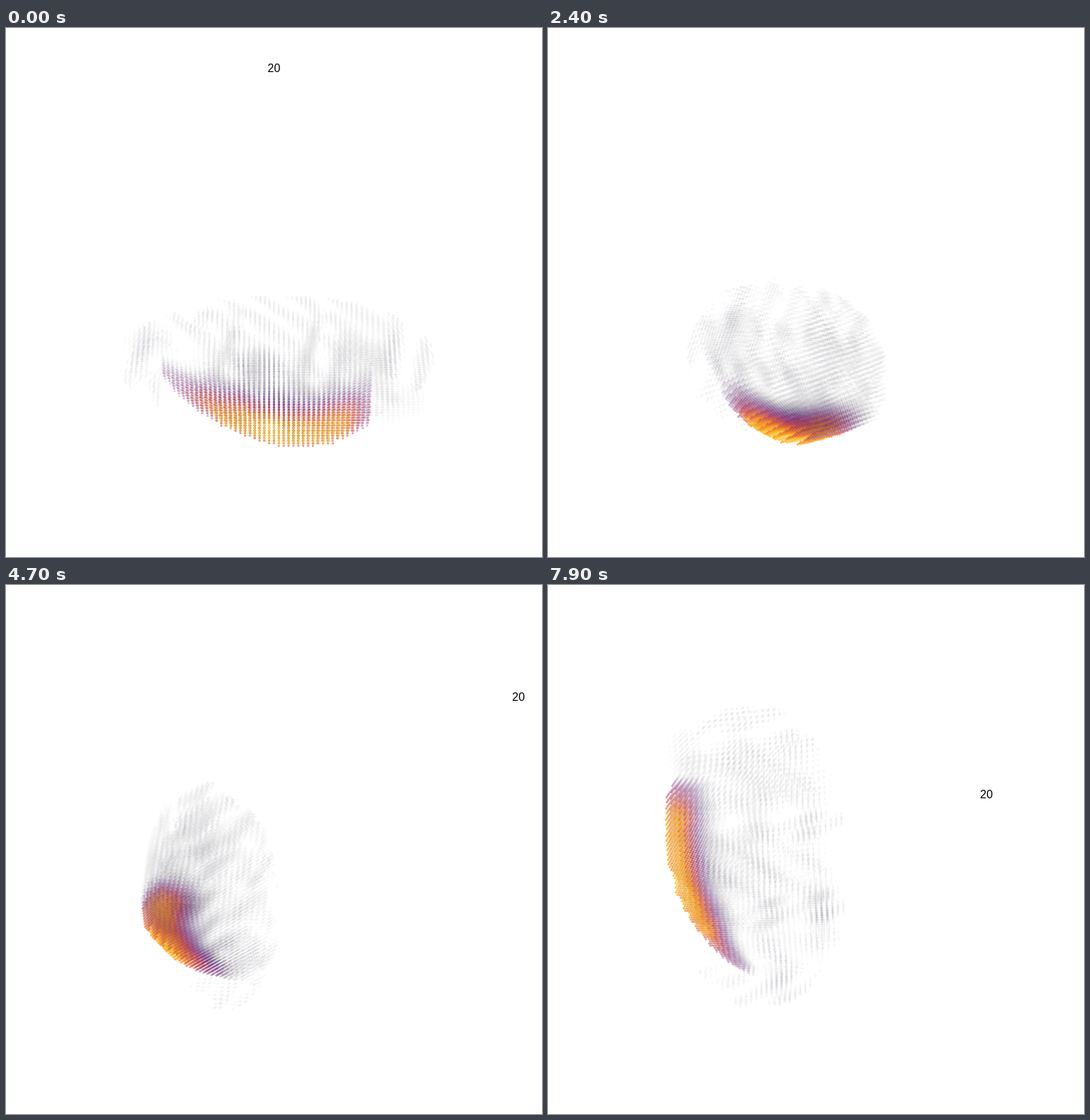
An HTML page with a canvas that plays this animation: 753x744 px, repeating every 8000 ms.

```html
<!DOCTYPE html>
<html lang="en">
<head>
<meta charset="utf-8">
<title>Rotating point cloud</title>
<style>
html, body { margin: 0; width: 100%; height: 100%; overflow: hidden; background: #fff; }
canvas { display: block; width: 753px; height: 744px; }
</style>
</head>
<body>
<canvas id="stage" width="753" height="744"></canvas>
<script>
const ctx = document.getElementById('stage').getContext('2d');
const LOOP = 8000, STEP = 100, DEG = Math.PI / 180;
const CENTER = { x: 376.5, y: 372 }, FOCAL = 1330, DISTANCE = 4.81;
const TILT_COS = Math.cos(70 * DEG), TILT_SIN = Math.sin(70 * DEG);

const clamp = (v, lo = 0, hi = 1) => Math.min(hi, Math.max(lo, v));
const bell = (v, mid, width) => Math.exp(-(((v - mid) / width) ** 2));
const ramp = (v, from, to) => {
  const u = clamp((v - from) / (to - from));
  return u * u * (3 - 2 * u);
};

// Dark violet to yellow colour scale
const SCALE = ['#000004', '#420a68', '#932667', '#dd513a', '#fca50a', '#fcffa4']
  .map(hex => [1, 3, 5].map(i => parseInt(hex.slice(i, i + 2), 16)));

function colour(level) {
  const pos = clamp(level) * (SCALE.length - 1), i = Math.min(SCALE.length - 2, Math.floor(pos));
  const rgb = SCALE[i].map((c, k) => Math.round(c + (SCALE[i + 1][k] - c) * (pos - i)));
  return `rgba(${rgb},${clamp(level * 0.95).toFixed(3)})`;
}

// Lower front edge of the body: a parabola in y and in z
const edgeY = x => -0.675 + 0.26 * ((x - 0.25) / 0.76) ** 2;
const edgeZ = x => -0.55 + 0.19 * ((x - 0.09) / (x < 0.09 ? 0.6 : 0.45)) ** 2;

// Centres of the denser grey lobes
const LOBES = [[-0.1, 0.03, -0.42], [0.17, -0.46, -0.38], [0.54, -0.57, -0.32], [-0.6, -0.2, -0.2], [-0.13, -0.64, -0.09]];

const wave = (x, y, z) =>
  Math.sin(17 * x + 9 * y + 2 * Math.sin(13 * z)) * Math.sin(15 * y - 12 * z + 2 * Math.sin(14 * x));

function slabLevel(x, a, b) {
  const left = ramp(x, -0.62, -0.1), right = ramp(x, 0.48, 0.3);
  const size = 0.4 + 0.6 * left;
  const q = ((a - 0.045) / (0.115 * size)) ** 2 + ((b - 0.08) / (0.165 * size)) ** 2;
  return 0.84 * (0.25 + 0.75 * left) * (0.35 + 0.65 * right) * Math.exp(-(q ** 1.3));
}

function skinLevel(x, y, z, a, b) {
  const along = ramp(x, -0.52, -0.25) * ramp(x, 0.42, 0.1);
  const under = 0.06 * bell(b, 0.03, 0.035) * ramp(y, 0.1, 0);
  const front = 0.045 * bell(a, 0.03, 0.045) * ramp(z, -0.02, -0.08);
  return along * (under + front);
}

function mistLevel(x, y, z, ripple) {
  const r = ((x - 0.02) / 0.78) ** 2 + ((y + 0.28) / 0.46) ** 2 + ((z + 0.25) / 0.3) ** 2;
  let level = r < 1 ? 0.06 * Math.max(0, ripple - 0.12) : 0;
  for (const [cx, cy, cz] of LOBES)
    level += 0.07 * bell(x, cx, 0.13) * bell(y, cy, 0.075) * bell(z, cz, 0.09);
  return level;
}

function intensity(x, y, z) {
  const a0 = y - edgeY(x), b0 = z - edgeZ(x);
  const a = a0 + 0.2 * b0 * ramp(x, 0.25, -0.3);
  const b = b0 + 0.3 * a0 - 0.35 * a0 * a0;
  const ends = x > 0.45 || x < -0.54;
  if (!ends && (a < 0 || b < 0 || a + b < 0.085)) return 0;
  const ripple = wave(x, y, z);
  const grey = mistLevel(x, y, z, ripple) + (ends ? 0 : skinLevel(x, y, z, a, b));
  return grey * (0.8 + 0.5 * ripple) + (ends ? 0 : slabLevel(x, a, b));
}

function buildCloud() {
  const points = [];
  for (let x = -0.736; x < 0.78; x += 0.023)
    for (let y = -0.74; y < 0.15; y += 0.025)
      for (let z = -0.62; z < -0.01; z += 0.027) {
        const level = intensity(x, y, z);
        if (level > 0.014) points.push({ x, y, z, fill: colour(level), sx: 0, sy: 0, depth: 0 });
      }
  return points;
}

// Spin about the cube diagonal, tilt, then perspective
function project(p, angle) {
  const c = Math.cos(angle), s = Math.sin(angle) / Math.sqrt(3);
  const mean = (p.x + p.y + p.z) / 3 * (1 - c);
  const x = mean + p.x * c + (p.z - p.y) * s;
  const y = mean + p.y * c + (p.x - p.z) * s;
  const z = mean + p.z * c + (p.y - p.x) * s;
  p.depth = TILT_COS * z - TILT_SIN * y;
  const scale = FOCAL / (DISTANCE - p.depth);
  p.sx = CENTER.x + x * scale;
  p.sy = CENTER.y - (TILT_COS * y + TILT_SIN * z) * scale;
}

const cloud = buildCloud();
const label = { x: 0, y: 1, z: 1 };

function draw(time) {
  const angle = time / 1000 * 30 * DEG;
  ctx.fillStyle = '#fff';
  ctx.fillRect(0, 0, 753, 744);
  for (const p of cloud) project(p, angle);
  cloud.sort((p, q) => p.depth - q.depth);
  for (const p of cloud) {
    ctx.fillStyle = p.fill;
    ctx.beginPath();
    ctx.arc(p.sx, p.sy, 1.65, 0, 2 * Math.PI);
    ctx.fill();
  }
  project(label, angle);
  ctx.fillStyle = '#000';
  ctx.font = '16px "Liberation Sans", Arial, sans-serif';
  ctx.textAlign = 'center';
  ctx.fillText('20', label.sx, Math.round(label.sy + 5));
}

let shown = -1;
const start = performance.now();
function tick() {
  const time = Math.floor(((performance.now() - start) % LOOP) / STEP) * STEP;
  if (time !== shown) draw(shown = time);
  requestAnimationFrame(tick);
}
tick();
</script>
</body>
</html>
```
